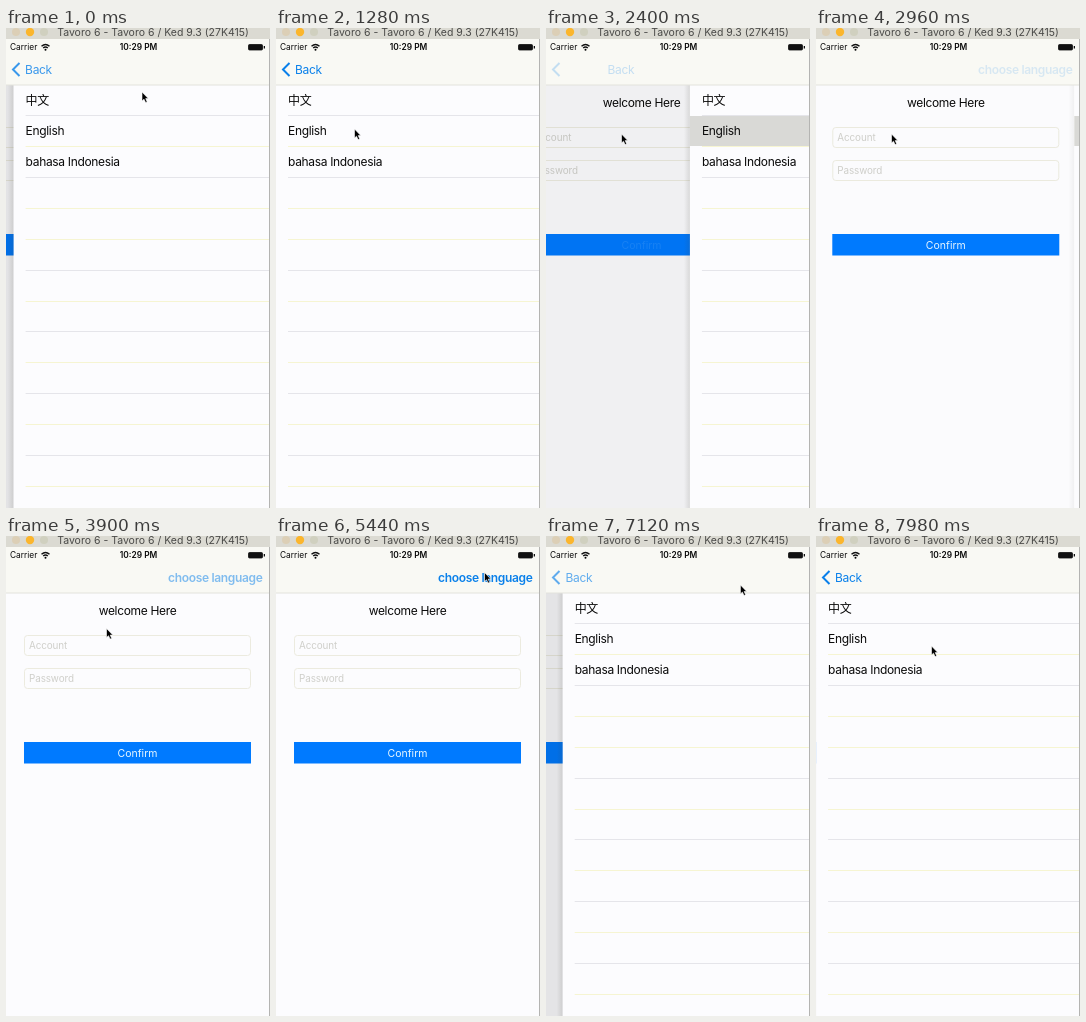
Animation of 264x480 px, one loop 8000 ms. Source, as an HTML page:

```html
<!DOCTYPE html>
<html lang="en">
<head>
<meta charset="utf-8">
<title>Language picker</title>
<style>
  html, body { margin: 0; width: 100%; height: 100%; overflow: hidden; background: #fcfcfe; }
  svg { display: block; width: 100vw; height: 100vh; }
  text { font: 12px Inter, "Noto Sans CJK SC", "Noto Sans CJK", sans-serif; letter-spacing: -.33px; fill: #0a0a0a; }
  .mid { text-anchor: middle; }
  .end { text-anchor: end; }
  .tint { fill: #0a80ea; }
  .bold { font-weight: 600; }
  .status { font-size: 8.4px; letter-spacing: 0; }
  .hint { font-size: 9.9px; letter-spacing: -.1px; fill: #cfcfca; }
  .window { font-size: 10.5px; letter-spacing: 0; fill: #4a4a48; }
  #confirm { font-size: 10.5px; letter-spacing: 0; fill: #e6f6ff; }
</style>
</head>
<body>
<svg viewBox="0 0 264 480" preserveAspectRatio="none">
  <defs>
    <linearGradient id="edge">
      <stop offset="0" stop-color="#44443c" stop-opacity="0"/>
      <stop offset="1" stop-color="#44443c" stop-opacity=".14"/>
    </linearGradient>
  </defs>
  <rect width="264" height="480" fill="#fcfcfe"/>

  <g id="form">
    <rect y="57" width="264" height="423" fill="#fcfcfe"/>
    <text class="mid" x="131.5" y="79">welcome Here</text>
    <g fill="#fcfcfe" stroke="#ecebdf">
      <rect x="18.5" y="99.5" width="226" height="20" rx="3"/>
      <rect x="18.5" y="132.5" width="226" height="20" rx="3"/>
    </g>
    <text class="hint" x="23" y="113">Account</text>
    <text class="hint" x="23" y="146">Password</text>
    <rect x="18" y="206" width="227" height="21.5" fill="#007aff"/>
    <text id="confirm" class="mid" x="131.5" y="221">Confirm</text>
    <rect id="dim" y="57" width="264" height="423" fill="#000"/>
  </g>

  <g id="list">
    <rect id="shadow" x="-6" y="57" width="6" height="423" fill="url(#edge)"/>
    <rect y="57" width="264" height="423" fill="#fcfcfe"/>
    <rect id="pressed" y="88" width="264" height="30" fill="#d9d9d6"/>
    <g id="rules"></g>
    <text x="12" y="76.6">中文</text>
    <text x="12" y="107">English</text>
    <text x="12" y="138">bahasa Indonesia</text>
  </g>

  <rect y="11" width="264" height="46" fill="#f9f9f4"/>
  <rect y="56.5" width="264" height="1" fill="#e3e3de"/>
  <g id="back">
    <path d="M13.5 35 L7 41.5 L13.5 48" fill="none" stroke="#0a80ea" stroke-width="2"/>
    <text id="backLabel" class="tint" x="19" y="46">Back</text>
  </g>
  <text id="choose" class="tint bold end" x="256.5" y="46">choose language</text>

  <text class="status" x="4" y="22">Carrier</text>
  <g fill="none" stroke="#111" stroke-width="1.4">
    <path d="M35.5 18.2 Q39.5 14.6 43.5 18.2"/>
    <path d="M37.2 20 Q39.5 18 41.8 20"/>
  </g>
  <circle cx="39.5" cy="21.7" r="1"/>
  <text class="status bold mid" x="132.5" y="22">10:29 PM</text>
  <rect x="242.5" y="16.5" width="14" height="5.5" rx="1" fill="#111" stroke="#111" stroke-width=".8"/>
  <rect x="257.7" y="18" width="1.3" height="2.5" fill="#111"/>

  <rect width="264" height="11" fill="#dbdad2"/>
  <circle cx="10" cy="4" r="4" fill="#dccfb6"/>
  <circle cx="24" cy="4" r="4.2" fill="#fbb62e"/>
  <circle cx="38" cy="4" r="4" fill="#d0d0bf"/>
  <text class="window mid" x="147" y="8">Tavoro 6 - Tavoro 6 / Ked 9.3 (27K415)</text>
  <rect x="263" y="11" width="1" height="469" fill="#b4b4b2"/>

  <path id="cursor" d="M0 0 V9 L2 7.2 L3.6 10.6 L5.2 9.9 L3.7 6.6 H6.3 Z"
        fill="#000" stroke="#fff" stroke-width=".6"/>
</svg>
<script>
const LOOP = 8000, WIDTH = 264, PARALLAX = 79;
const POP = 2140, PUSH = 6484, EARLIER_PUSH = -771;
const el = id => document.getElementById(id);

// Tables of [time, value...]
const backFade = [[0, .8], [400, 1], [POP, 1], [2400, .22], [2600, 0], [6600, 0], [7255, .8], [7655, 1]];
const chooseFade = [[0, 0], [2600, 0], [3900, .5], [4300, 1], [6380, 1], [6540, 0]];
const confirmFade = [[0, .1], [2400, .1], [2800, 1]];
const cursorPath = [
  [0, 136, 64], [1280, 78.5, 101], [2000, 75.5, 106], [3400, 75.5, 106],
  [3900, 100.5, 92.5], [4900, 208.5, 36.5], [5440, 208.5, 36.5],
  [6560, 208.5, 38], [6900, 208.5, 38], [7800, 115.5, 110]
];

const smooth = u => u * u * (3 - 2 * u);

function sample(table, time, ease = u => u) {
  const next = table.findIndex(step => step[0] > time);
  if (next < 0) return table[table.length - 1].slice(1);
  const from = table[next - 1], to = table[next];
  const u = ease((time - from[0]) / (to[0] - from[0]));
  return from.slice(1).map((v, i) => v + (to[i + 1] - v) * u);
}

// Remaining distance of a critically damped spring, from 1 down to 0
function remaining(ms) {
  const k = ms * .007;
  return (1 + k) * Math.exp(-k);
}

function listOffset(t) {
  if (t < POP) return remaining(t - EARLIER_PUSH);
  if (t < PUSH) return 1 - remaining(t - POP);
  return remaining(t - PUSH);
}

const warmRules = [2, 4, 5, 7, 9, 11, 13];
for (let i = 1; i <= 13; i++) {
  const rule = document.createElementNS(el('list').namespaceURI, 'rect');
  const color = warmRules.includes(i) ? '#f6f5d2' : '#e5e5ea';
  const box = { x: 12, y: Math.floor(57 + i * 30.86), width: WIDTH - 12, height: 1, fill: color };
  for (const name in box) rule.setAttribute(name, box[name]);
  el('rules').append(rule);
}

const move = (id, x, y = 0) => el(id).setAttribute('transform', `translate(${x} ${y})`);
const fade = (id, value) => el(id).setAttribute('opacity', value);

function draw(t) {
  const away = listOffset(t);
  move('list', WIDTH * away);
  move('form', -PARALLAX * (1 - away));
  fade('dim', .1 * (1 - away));
  fade('shadow', Math.min(1, 20 * (1 - away)));
  move('backLabel', 143 * away * away);
  fade('back', sample(backFade, t)[0]);
  fade('choose', sample(chooseFade, t)[0]);
  fade('confirm', sample(confirmFade, t)[0]);
  fade('pressed', t > 2000 && t < 3500 ? 1 : 0);
  move('cursor', ...sample(cursorPath, t, smooth));
}

const start = performance.now();
function tick() {
  draw((performance.now() - start) % LOOP);
  requestAnimationFrame(tick);
}
draw(0);
requestAnimationFrame(tick);
</script>
</body>
</html>
```
